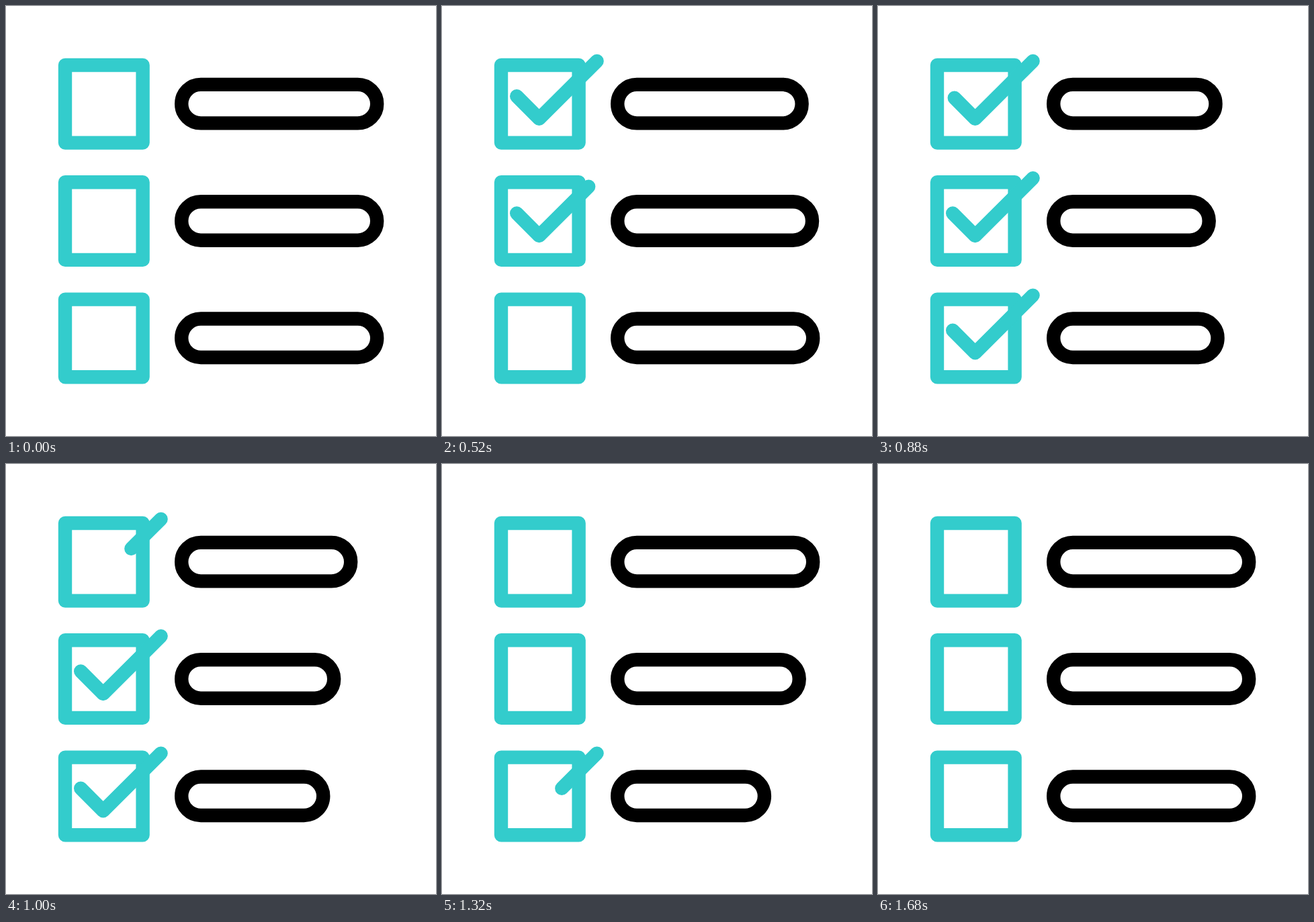
Animation of 640 by 640 pixels, one loop 2000 ms. Source, as an HTML page:

```html
<!DOCTYPE html>
<html lang="en">
<head>
<meta charset="utf-8">
<title>Checklist</title>
<style>
  html, body { margin: 0; width: 100%; height: 100%; overflow: hidden; background: #fff; }
  svg { display: block; width: 100vw; height: 100vh; }
  rect, path { fill: none; stroke-width: 20.4; stroke-linecap: round; stroke-linejoin: round; }
  .box, .tick { stroke: #33cccc; }
  .bar { stroke: #000; }
</style>
</head>
<body>
<svg id="stage" viewBox="0 0 640 640"></svg>
<script>
const LOOP = 2000, STEP = 40, ROW_GAP = 174.3, BAR_WIDTH = 291;

// Each span is [start, duration] in ms; shrink is how far the bar shortens.
const rows = [
  { draw: [210, 225], erase: [859, 240], out: [346, 450], back: [874, 421], shrink: 49.7 },
  { draw: [340, 225], erase: [1054, 240], out: [482, 475], back: [1058, 421], shrink: 64 },
  { draw: [521, 225], erase: [1190, 240], out: [651, 458], back: [1175, 472], shrink: 93.3 }
];

const stage = document.getElementById("stage");

function add(parent, tag, attrs) {
  const el = document.createElementNS("http://www.w3.org/2000/svg", tag);
  for (const key in attrs) el.setAttribute(key, attrs[key]);
  return parent.appendChild(el);
}

function ease(t, [start, duration]) {
  const u = Math.min(1, Math.max(0, (t - start) / duration));
  return u * u * (3 - 2 * u);
}

rows.forEach((row, i) => {
  const g = add(stage, "g", { transform: `translate(0 ${i * ROW_GAP})` });
  add(g, "rect", { class: "box", x: 88, y: 88, width: 115.6, height: 115.6 });
  row.tick = add(g, "path", {
    class: "tick", pathLength: 1, d: "M111.2 134.2L144.6 167.7L230.6 82"
  });
  row.bar = add(g, "rect", {
    class: "bar", x: 261.2, y: 116.9, width: BAR_WIDTH, height: 57.5, rx: 28.75
  });
});

function render(t) {
  for (const row of rows) {
    const head = ease(t, row.draw), tail = ease(t, row.erase);
    const shown = head - tail;
    row.tick.style.display = shown > 0 ? "" : "none";
    row.tick.setAttribute("stroke-dasharray", shown < 1 ? `${shown} 2` : "none");
    row.tick.setAttribute("stroke-dashoffset", -tail);
    const pull = ease(t, row.out) - ease(t, row.back);
    row.bar.setAttribute("width", BAR_WIDTH - row.shrink * pull);
  }
}

const began = performance.now();
function tick() {
  const t = (performance.now() - began) % LOOP;
  render(Math.floor(t / STEP) * STEP);
  requestAnimationFrame(tick);
}
render(0);
requestAnimationFrame(tick);
</script>
</body>
</html>
```
